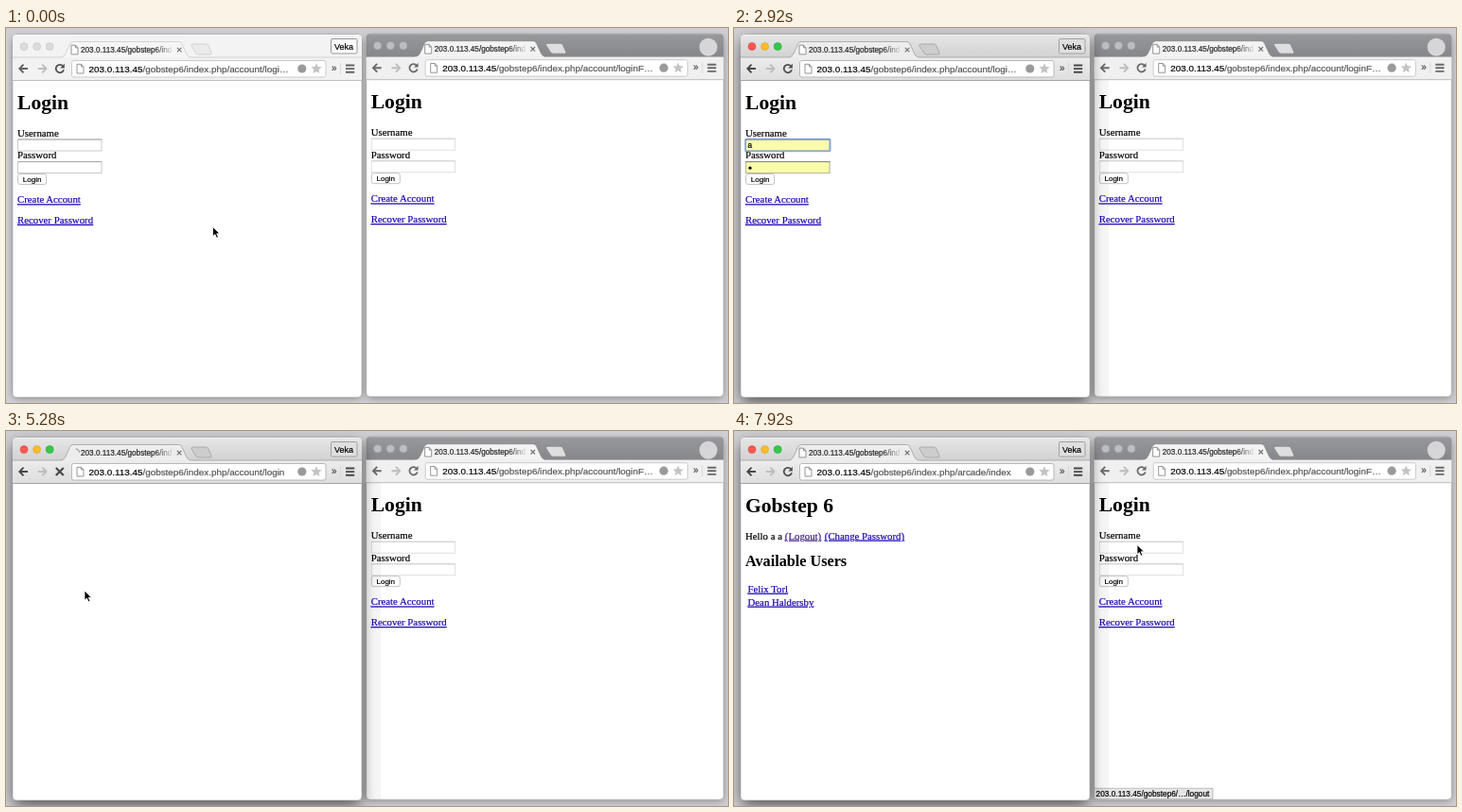
Recreate the animation shown at these times as an HTML page. Size 763 by 397 pixels, loop 8000 ms.

```html
<!DOCTYPE html>
<html lang="en">
<head>
<meta charset="utf-8">
<title>Two browser windows</title>
<style>
  html, body { margin: 0; width: 100%; height: 100%; overflow: hidden; background: #cbcbcf; }
  svg { display: block; width: 763px; height: 397px; }
  text { font: 10.8px "Liberation Serif", Tinos, serif; white-space: pre; color: #000; }
  text, tspan { fill: currentColor; stroke: currentColor; stroke-width: .2px; }
  text.ui { font-family: "Liberation Sans", Arimo, sans-serif; }
  text.h1 { font-size: 21.6px; font-weight: bold; stroke: none; }
  text.h2 { font-size: 16.2px; font-weight: bold; stroke: none; }
  text.link { color: #1c06b4; text-decoration: underline; }
  text.seen { color: #3d1c82; }
</style>
</head>
<body>
<svg id="stage" viewBox="0 0 763 397" xmlns="http://www.w3.org/2000/svg"></svg>
<script>
const LOOP = 8000;
const HOST = '203.0.113.45';
const APP = '/gobstep6';
const INDEX = APP + '/index.php';

const text = (x, y, s, cls = '', style = '') =>
  `<text x="${x}" y="${y}" class="${cls}" style="${style}">${s}</text>`;
const ui = (x, y, size, s, style = '') =>
  text(x, y, s, 'ui', `font-size:${size}px;${style}`);
const rect = (x, y, w, h, fill, more = '') =>
  `<rect x="${x}" y="${y}" width="${w}" height="${h}" fill="${fill}" ${more}/>`;
const path = (d, stroke, width = 1, fill = 'none') =>
  `<path d="${d}" stroke="${stroke}" stroke-width="${width}" fill="${fill}"/>`;
const group = (id, body, more = '') => `<g id="${id}" ${more}>${body}</g>`;
const gradient = (id, a, b) =>
  `<linearGradient id="${id}" x1="0" y1="0" x2="0" y2="1">
    <stop stop-color="${a}"/><stop offset="1" stop-color="${b}"/></linearGradient>`;
const blur = (id, dev) =>
  `<filter id="${id}" x="-20%" y="-20%" width="140%" height="140%"><feGaussianBlur stdDeviation="${dev}"/></filter>`;

const sheet = (x, y) =>
  path(`M${x} ${y}h4.5l2.5 2.7v7h-7zM${x + 4.5} ${y}v2.7h2.5`, '#8a8a8a', .9, '#fff');

const url = (x, y, rest) =>
  ui(x, y, 9.9, `${HOST}<tspan style="color:#555">${rest}</tspan>`);

function star(cx, cy, r) {
  let d = '';
  for (let i = 0; i < 10; i++) {
    const a = -Math.PI / 2 + i * Math.PI / 5, q = i % 2 ? r * .45 : r;
    d += (i ? 'L' : 'M') + (cx + q * Math.cos(a)).toFixed(2) + ' ' + (cy + q * Math.sin(a)).toFixed(2);
  }
  return `<path d="${d}z" fill="#c3c3c7"/>`;
}

const arrow = (x, dir, color) =>
  path(`M${x + dir * 9.5} 43H${x + dir}M${x + dir * 5} 38.6L${x + dir * .8} 43l${dir * 4.2} 4.4`, color, 1.9);

const TAB = 'M58.5 31Q61.5 30.5 63 27L67.5 17Q68.6 14.5 71 14.5H182.5Q185 14.5 186 17L190.5 27Q192 30.5 195 31';
const NEW_TAB = 'M197.5 17H211q2 0 3 2l3 7q.6 2-1.5 2H203.5q-2 0-3-2L196 19q-.7-2 1.5-2z';

// Title strip, tab and toolbar; dx shifts the icons on the right side.
function chrome(o) {
  const w = 369 + o.dx, R = 7 + w;
  return path(`M7 31V11q0-4 4-4H${R - 4}q4 0 4 4V31z`, 'none', 0, o.bar)
    + path(`M10 7.5H${R - 3}`, o.edge, 1)
    + rect(7, 31, w, 24.3, o.tool)
    + path(`M7 31H59M195 31H${R}`, o.rim, .8)
    + `<g transform="translate(${o.tabShift} 0)">`
    + path(NEW_TAB, o.rim, .8, o.plus) + path(TAB, o.rim, .8, o.tab) + '</g>'
    + path(`M7 55.5H${R}`, o.base, 1)
    + o.lights.map((c, i) =>
        `<circle cx="${19 + i * 13.6}" cy="19.6" r="4" fill="${c[0]}" stroke="${c[1]}" stroke-width=".6"/>`).join('')
    + ui(79, 25.7, 8.2, HOST + APP + '/ind', 'fill:url(#fade);stroke:url(#fade)')
    + path('M180.8 20.8l4.6 4.6m0-4.6l-4.6 4.6', '#6c6c6c', 1.1)
    + rect(69.5, 34.5, 268.5 + o.dx, 17.5, '#fff', `rx="2" stroke="${o.field}" stroke-width=".9"`)
    + sheet(75, 38.3)
    + arrow(13.5, 1, o.ink) + arrow(43.3, -1, '#bdbdbd')
    + `<circle cx="${312.8 + o.dx}" cy="43" r="4.6" fill="#9a9a9a"/>`
    + star(328 + o.dx, 43.2, 6)
    + ui(344 + o.dx, 46, 10, '»', 'color:#444')
    + path(`M${353.5 + o.dx} 37v12`, '#d2d2d2', .7)
    + path(`M${359 + o.dx} 39.5h9.2m-9.2 3.6h9.2m-9.2 3.6h9.2`, o.ink, 1.9);
}

const reload = ink =>
  path('M60.2 40.4A4.2 4.2 0 1 0 61 44.2', ink, 1.8) + `<path d="M61.9 37.8v4.6h-4.6z" fill="${ink}"/>`;

const input = (y, border, top) =>
  rect(12.5, y, 88.5, 12, '#fff', `stroke="${border}" stroke-width=".9"`)
  + path(`M12.5 ${y}h88.5`, top, .9);

const loginPage = (border, top) =>
  text(12, 86, 'Login', 'h1')
  + text(12, 114.6, 'Username') + input(118, border, top)
  + text(12, 138.4, 'Password') + input(141.6, border, top)
  + rect(12.6, 154.5, 30, 11, '#fff', 'rx="2.2" stroke="#bbb" stroke-width=".9" class="button"')
  + ui(17.8, 162.8, 8, 'Login')
  + text(12, 185.3, 'Create Account', 'link')
  + text(12, 206.9, 'Recover Password', 'link');

const filled = y =>
  rect(12.5, y, 88.5, 12, '#f8fcab', 'stroke="#b4b49a" stroke-width=".9"')
  + path(`M12 ${y}h89.5`, '#85857a', 1);

const bubble = (x, y, w, s) =>
  rect(x, y, w, 11.6, '#e6e6e8', 'stroke="#b2b2b2" stroke-width=".8"') + ui(x + 2.2, y + 8.7, 8.3, s);

const badge = (fill, rim) =>
  rect(343.5, 11.5, 27.5, 15.5, fill, `rx="1.5" stroke="${rim}" stroke-width=".9"`) + ui(347, 22.8, 9, 'Veka');

const same = (fill, rim) => Array(3).fill([fill, rim]);
const vivid = [['#fb5a54', '#de4640'], ['#fcbb30', '#dd9f25'], ['#34c748', '#29a63a']];

const idle = { dx: 0, tabShift: 0, lights: same('#dcdcdc', '#c4c4c4'), bar: '#f3f3f3', edge: '#fafafa', rim: '#cacaca',
  plus: '#ebebeb', tool: '#f2f2f2', tab: '#f6f6f6', base: '#bdbdbd', field: '#c6c6c6', ink: '#626262' };
const live = { dx: 0, tabShift: 0, lights: vivid, bar: 'url(#barLive)', edge: '#f3f3f3', rim: '#a0a0a0',
  plus: '#cdcdcd', tool: 'url(#toolLive)', tab: '#ededed', base: '#a4a4a4', field: '#b2b2b2', ink: '#484848' };
const dark = { dx: 8.6, tabShift: 1, lights: same('#bdbec1', '#a9aaad'), bar: 'url(#barDark)', edge: '#a8a9ac', rim: '#85868a',
  plus: '#dededf', tool: '#f0f0f0', tab: '#f3f3f3', base: '#bcbcbc', field: '#c6c6c6', ink: '#6a6a6a' };

const shadow = (x, y, w, h, f, o) => rect(x, y, w, h, '#000', `opacity="${o}" filter="url(#${f})" rx="4"`);

const rightWindow = shadow(8, 11, 376, 381, 'soft', .38)
  + rect(7, 7, 377.6, 384, '#fff', 'rx="4" stroke="#a5a5a5" stroke-width=".6"')
  + chrome(dark) + sheet(69, 18.2) + reload('#6a6a6a')
  + url(87.5, 46.5, INDEX + '/account/loginF…')
  + '<circle cx="368.5" cy="21" r="9.5" fill="#d6d6d8"/>'
  + loginPage('#dadada', '#cfcfcf');

const home = text(12, 86, 'Gobstep 6', 'h1')
  + text(12, 114.6, 'Hello a a ')
  + text(53.8, 114.6, '(Logout)', 'link seen')
  + text(95.8, 114.6, '(Change Password)', 'link')
  + text(12, 143.2, 'Available Users', 'h2');

document.getElementById('stage').innerHTML = `<defs>
    ${gradient('barLive', '#e6e6e6', '#d2d2d2')}
    ${gradient('toolLive', '#ececec', '#dedede')}
    ${gradient('barDark', '#98999c', '#86878b')}
    ${blur('soft', 4)}${blur('deep', 8)}
    <linearGradient id="fade" gradientUnits="userSpaceOnUse" x1="156" y1="0" x2="177" y2="0">
      <stop stop-color="#222"/><stop offset="1" stop-color="#222" stop-opacity="0"/></linearGradient>
  </defs>`
  + rect(0, 0, 763, 397, '#cfcfd3')
  + group('right', rightWindow, 'transform="translate(373.7 -.8)"')
  + group('logoutTip', bubble(380.4, 378.2, 125.6, `${HOST}${APP}/…/logout`))
  + group('idleShadow', shadow(8, 11, 367, 380, 'soft', .42))
  + group('liveShadow', shadow(8, 14, 367, 382, 'deep', .62) + rect(376, 55, 20, 335, '#000010', 'opacity=".035"'))
  + rect(7, 7, 369, 384, '#fff', 'rx="4" stroke="#9c9c9c" stroke-width=".6"')
  + group('idle', chrome(idle) + badge('#fafafa', '#8e8e8e'))
  + group('live', chrome(live) + badge('#dfdfdf', '#9a9a9a'))
  + group('reload', reload('#505050'))
  + group('stop', path('M52.8 39l8 8m0-8l-8 8', '#484848', 2.2))
  + group('tabIcon', sheet(69, 18.2))
  + group('spinner', path('M0-4A4 4 0 0 1 4 0', '#9b9b9b', 1.2))
  + group('urlForm', url(87.5, 47, INDEX + '/account/logi…'))
  + group('urlPost', url(87.5, 47, INDEX + '/account/login'))
  + group('urlHome', url(87.5, 47, INDEX + '/arcade/index'))
  + group('login', loginPage('#c4c4c4', '#a4a4a4')
    + group('autofill', filled(118) + filled(141.6))
    + group('ring', rect(12, 117.6, 89.6, 12.8, 'none', 'rx="1" stroke="#7d9fe0" stroke-width="1.8" opacity=".85"'))
    + group('caret', path('M15.5 119.8v8.6', '#000', .8))
    + group('typed', ui(14.5, 127, 8.2, 'a'))
    + group('secret', '<circle cx="17" cy="148.2" r="1.6"/>'))
  + group('home', home)
  + group('users', text(14.5, 170.8, 'Felix Torl', 'link') + text(14.5, 184.7, 'Dean Haldersby', 'link'))
  + group('waitTip', bubble(7.4, 379.4, 116, `Waiting for ${HOST}…`))
  + group('arrow', path('M0 0V10.2L2.4 8 4.1 11.8 5.9 11 4.2 7.3H7.4z', '#fff', .8, '#000'))
  + group('beam', path('M-2-4.5Q0-4.5 0-3Q0-4.5 2-4.5M0-3.5V3.5M-2 4.5Q0 4.5 0 3Q0 4.5 2 4.5M-1 .8H1', '#222', .9));

const el = id => document.getElementById(id);
const show = (id, on) => { el(id).style.display = on ? '' : 'none'; };
const clamp = v => Math.max(0, Math.min(1, v));

// time, x, y of the pointer tip
const track = [
  [0, 218.5, 210.5], [20, 218.5, 210.5], [60, 215, 207],
  [920, 215, 207], [1480, 52, 123],
  [3120, 52, 123], [3520, 126, 121.5], [3920, 82, 138],
  [3960, 82, 138], [4140, 27.5, 158],
  [4900, 27.5, 158], [5240, 83, 169],
  [5580, 83, 169], [5760, 89.5, 171.5],
  [6960, 89.5, 171.5], [7160, 98, 116], [7740, 422, 119],
  [7780, 422, 119], [7920, 426, 120.5], [LOOP, 426, 120.5]
];

function pointer(t) {
  let i = 1;
  while (i < track.length - 1 && track[i][0] <= t) i++;
  const [t0, x0, y0] = track[i - 1], [t1, x1, y1] = track[i];
  const p = clamp((t - t0) / (t1 - t0)), e = p * p * (3 - 2 * p);
  return [x0 + (x1 - x0) * e, y0 + (y1 - y0) * e];
}

function draw(t) {
  const within = (a, b = LOOP) => t >= a && t < b;
  const active = within(280), loading = within(4880, 5540);

  show('idle', !active); show('idleShadow', !active);
  show('live', active); show('liveShadow', active);
  show('reload', !loading); show('stop', loading);
  show('tabIcon', !loading); show('spinner', loading);
  el('spinner').setAttribute('transform', `translate(73.5 23) rotate(${-(t - 5280) * .36})`);

  show('urlForm', t < 4880);
  show('urlPost', within(4880, 5500));
  show('urlHome', within(5500));

  show('login', t < 5000);
  show('ring', within(2110, 4380));
  show('caret', within(2140, 2660));
  show('typed', within(2660));
  show('autofill', within(2890));
  show('secret', within(2890));
  el('login').querySelector('.button').setAttribute('fill', within(4760, 4880) ? '#d9d9d9' : '#fff');

  show('home', within(5580));
  show('users', within(6120));
  show('waitTip', within(5480, 5760));
  el('waitTip').style.opacity = 1 - clamp((t - 5640) / 120);
  show('logoutTip', within(7200));
  el('logoutTip').style.opacity = clamp((t - 7200) / 150);

  const [x, y] = pointer(t), place = `translate(${x.toFixed(2)} ${y.toFixed(2)})`;
  const inField = t < 4300 && x < 101 && ((y > 117 && y < 131) || (y > 141 && y < 154));
  const hidden = within(2890, 3120);
  show('beam', inField && !hidden);
  show('arrow', !inField && !hidden);
  el('beam').setAttribute('transform', place);
  el('arrow').setAttribute('transform', place);
}

const start = performance.now();
function tick() {
  draw((performance.now() - start) % LOOP);
  requestAnimationFrame(tick);
}
tick();
</script>
</body>
</html>
```
